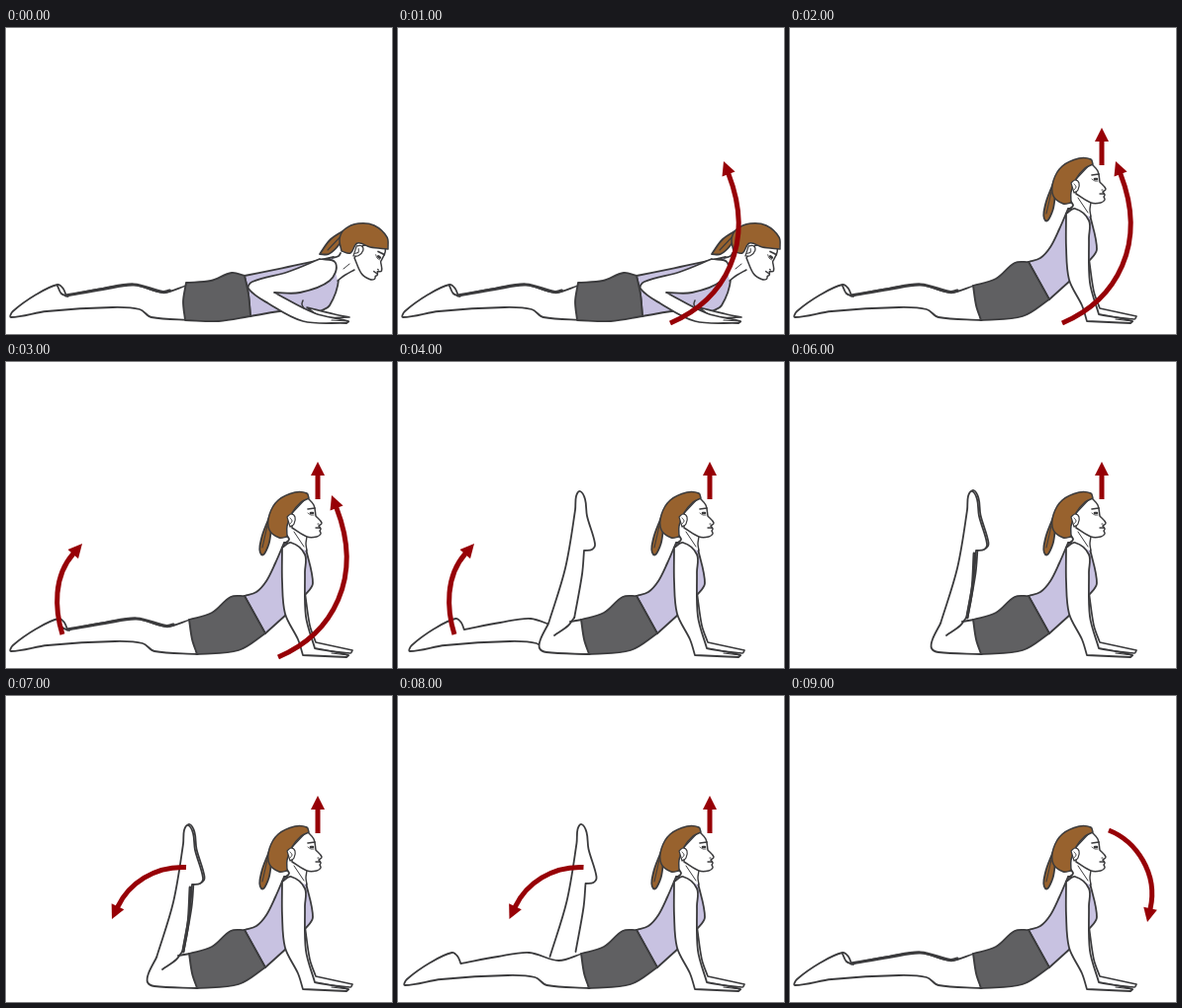
These frames come from a looping animation (390 by 310 pixels, 10000 ms). An HTML page with a canvas:

```html
<!DOCTYPE html>
<html lang="en">
<head>
<meta charset="utf-8">
<title>Back extension exercise</title>
<style>
html, body { margin: 0; width: 100%; height: 100%; overflow: hidden; background: #fff; }
canvas { display: block; width: 390px; height: 310px; }
</style>
</head>
<body>
<canvas id="stage"></canvas>
<script>
const W = 390, H = 310, STEP = 1000;
const INK = '#3b3b3d', SKIN = '#fff', SHIRT = '#c8c2e1', SHORTS = '#606062',
      HAIR = '#98622e', RED = '#970006';
const canvas = document.getElementById('stage');
const ctx = canvas.getContext('2d');
const dpr = window.devicePixelRatio || 1;
canvas.width = W * dpr;
canvas.height = H * dpr;

// Smooth curve through "x,y" key points; "/" marks a sharp corner.
// Handles follow the neighbours' direction and a third of the span.
function trace(text) {
  const path = new Path2D();
  let last = null;
  for (const part of text.split('/')) {
    const p = part.trim().split(/\s+/).map(s => s.split(',').map(Number));
    if (last) p.unshift(last);
    else path.moveTo(...p[0]);
    const handle = (i, reach) => {
      const a = p[i - 1] || p[i], b = p[i + 1] || p[i];
      const k = reach / (Math.hypot(b[0] - a[0], b[1] - a[1]) || 1);
      return [p[i][0] + (b[0] - a[0]) * k, p[i][1] + (b[1] - a[1]) * k];
    };
    for (let i = 0; i < p.length - 1; i++) {
      const reach = Math.hypot(p[i + 1][0] - p[i][0], p[i + 1][1] - p[i][1]) / 3;
      path.bezierCurveTo(...handle(i, reach), ...handle(i + 1, -reach), ...p[i + 1]);
    }
    last = p[p.length - 1];
  }
  return path;
}

function line(text, width = 1.8) {
  ctx.strokeStyle = INK;
  ctx.lineWidth = width;
  ctx.stroke(trace(text));
}

function fill(text, color) {
  ctx.fillStyle = color;
  ctx.fill(trace(text));
}

function shape(text, color, width = 1.8) {
  const closed = text + ' / ' + text.trim().split(/\s+/)[0];
  fill(closed, color);
  line(closed, width);
}

function at(x, y, draw, { turn = 0, stretch = 1 } = {}) {
  ctx.save();
  ctx.translate(x, y);
  ctx.rotate(turn);
  ctx.scale(stretch, 1);
  draw();
  ctx.restore();
}

// Bezier shaft with a head pointing away from the last control point.
function arrow(x0, y0, x1, y1, x2, y2, tipX, tipY) {
  const len = Math.hypot(tipX - x2, tipY - y2);
  const ux = (tipX - x2) / len, uy = (tipY - y2) / len;
  const x = tipX - 14 * ux, y = tipY - 14 * uy;
  ctx.lineCap = 'butt';
  ctx.strokeStyle = ctx.fillStyle = RED;
  ctx.lineWidth = 5;
  ctx.beginPath();
  ctx.moveTo(x0, y0);
  ctx.bezierCurveTo(x1, y1, x2, y2, x, y);
  ctx.lineTo(x + ux, y + uy);
  ctx.stroke();
  ctx.beginPath();
  ctx.moveTo(tipX, tipY);
  ctx.lineTo(x - 7 * uy, y + 7 * ux);
  ctx.lineTo(x + 7 * uy, y - 7 * ux);
  ctx.fill();
  ctx.lineCap = 'round';
}

const up = () => arrow(315, 139, 315, 130, 315, 120, 315, 101);
const lift = () => arrow(275, 299, 331, 275, 361, 218, 329, 135);
const bend = () => arrow(57, 276, 49, 250, 48, 217, 77, 184);
const lower = () => arrow(182, 173.5, 150, 172, 124, 190, 107, 226);
const lowerNext = () => at(5.5, 0, lower);
const down = () => arrow(322, 136, 350, 147, 372, 180, 361, 229);

// Face and ear are drawn around the eye.
function profile() {
  shape('-5,-16 2,-8 4,3 / 10,10 7,13 / 9,16 8,18 / 9,21 5,24 -5,24 -20,15 / -20,0', SKIN, 1.5);
  line('-4,-4 3,-5', 1.7);
  line('-1,0 1,0', 2.6);
  line('-4,0 -1,2 2,2', .8);
  line('4,15 8,15', 1.4);
  line('6,11 7,11', 1.2);
}

function ear() {
  shape('-25,4 -21,1 -17,4 -18,11 -22,14', SKIN, 1.2);
  line('-22,5 -20,8 -22,11', 1);
}

function head(x, y, turn, hair, tail, strand) {
  at(x, y, profile, { turn });
  shape(tail, HAIR);
  line(strand, 1.1);
  shape(hair, HAIR, 1.5);
  at(x, y, ear, { turn });
}

// Lying leg between toe and hip; the other leg shows as a heavy edge.
function leg(toe, hip, doubled) {
  at(toe, 0, () => {
    shape('182,261 158,268 128,260 96,264 58,271 / 55,264 49,260 27,270 3,287 1,293 38,287 106,283 134,285 146,293 189,296', SKIN);
    if (doubled) {
      line('58,271 96,264.5 128,260 158,267.5 165,266', 3.2);
      line('49,261 53,269 60,272');
    }
  }, { stretch: (hip - toe) / 182 });
}

function shin() {
  const edge = '152,265 169,209 179,150 180,136 184,131 189,139 191,156 199,184 196,190 188,191 / 186,215 178,260';
  fill(edge, SKIN);
  line(edge);
}

const farShin = () => at(1.5, -1, shin);

function raisedLeg() {
  shin();
  const knee = '152,265 144,281 143,290 150,294 193,296';
  fill(knee + ' / 186,261 / 178,260', SKIN);
  line(knee);
  line('178,259 172,267 158,277');
  line('174,263 186,261');
}

function prone() {
  leg(4, 182, true);
  shape('241,251 285,242 331,232 / 336,255 327,281 317,287 / 285,286 247,292 / 245,270 241,251', SHIRT);
  shape('182,258 207,256 228,248 241,251 / 245,270 247,292 / 215,297 181,296 / 179,277 182,258', SHORTS);
  shape('304,283 332,290 347,293 / 318,294', SKIN, 1.6);
  fill('339,226 330,233 / 335,256 / 351,246 / 362,232', SKIN);
  line('338,228 336,231 330,233');
  line('352,245 343,250 335,256', 1.5);
  line('347,239 341,244', 1);
  head(377, 232, .61,
    '386,224 385,212 372,200 356,198 342,204 337,214 339,226 / 348,228 355,218 368,222 386,224',
    '345,203 328,214 317,229 / 326,229 336,220 345,205', '341,208 325,225');
  shape('317,234 285,247 249,257 245,264 265,279 300,297 344,299 / 346,297 312,289 271,268 / 297,268 327,256 333,238 317,234', SKIN);
  line('300,276 299,280 301,284', 1.5);
  line('329,296 345,297', 1.2);
}

function cobra(...legs) {
  legs.forEach(draw => draw());
  // Far arm, torso
  shape('302,233 307,267 313,284 / 350,292 / 348,295 306,290 / 298,235', SKIN, 1.7);
  shape('281,183 272,204 263,222 253,233 241,237 / 262,275 / 283,256 / 303,235 310,224 303,189 / 290,183', SHIRT);
  fill('283,174 285,184 / 303,191 / 304,176', SKIN);
  line('284,176 286,180 281,184');
  line('304,177 303,184 304,191', 1.4);
  line('291,172 301,187', 1);
  head(309, 153, 0,
    '306,138 304,133 292,132 275,140 266,155 266,170 276,178 284,177 / 284,166 289,153 298,142 306,138',
    '266,157 258,179 258,195 265,186 268,170', '264,166 259,188');
  shape('185,261 208,254 227,238 241,237 / 262,275 / 235,292 193,296 / 188,281 185,261', SHORTS);
  // Near arm
  shape('279,188 279,222 282,255 295,281 300,297 / 344,299 / 346,297 312,290 / 303,258 302,213 302,195 288,183 279,188', SKIN);
  line('329,295 346,297', 1.2);
}

const both = () => cobra(() => leg(4, 186, true));
const oneUp = () => cobra(() => leg(11, 186), raisedLeg);
const folded = () => cobra(farShin, raisedLeg, () => line('186,194 184,230 179,259', 2.8));
const oneDown = () => cobra(farShin, () => leg(6, 186));

// One entry per second
const scenes = [
  [prone],
  [prone, lift],
  [both, up, lift],
  [both, up, lift, bend],
  [oneUp, up, bend],
  [folded, up, lift],
  [folded, up],
  [folded, up, lower],
  [oneDown, up, lowerNext],
  [both, down]
];

let start = null, shown = -1;
function tick(now) {
  if (start === null) start = now;
  const i = Math.floor((now - start) / STEP) % scenes.length;
  if (i !== shown) {
    shown = i;
    ctx.setTransform(dpr, 0, 0, dpr, 0, 0);
    ctx.lineCap = ctx.lineJoin = 'round';
    ctx.fillStyle = '#fff';
    ctx.fillRect(0, 0, W, H);
    scenes[i].forEach(draw => draw());
  }
  requestAnimationFrame(tick);
}
requestAnimationFrame(tick);
</script>
</body>
</html>
```
